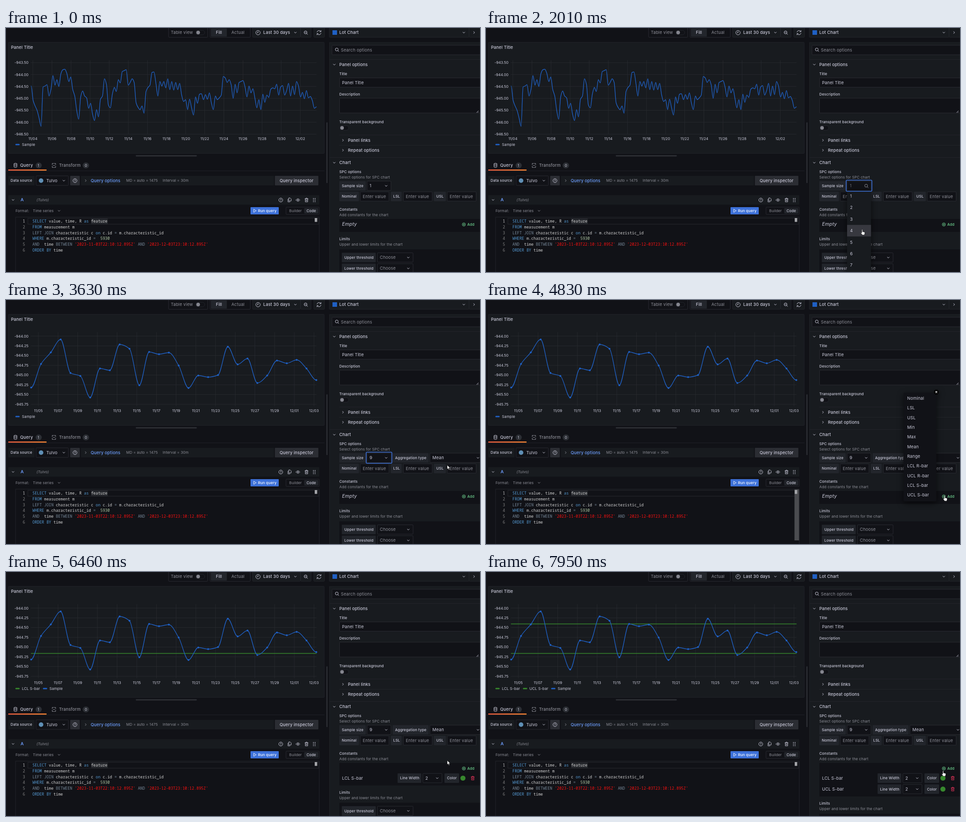
These frames come from a looping animation (1041 by 538 pixels, 8 s). An HTML page:

```html
<!DOCTYPE html>
<html lang="en">
<head>
<meta charset="utf-8">
<title>Panel editor</title>
<style>
html, body { margin: 0; width: 100%; height: 100%; overflow: hidden; background: #111217; }
svg { display: block; width: 1041px; height: 538px; font-family: Inter, sans-serif; letter-spacing: .01em; }
text { white-space: pre; }
.axis { letter-spacing: 0; }
.code { font-family: "Noto Sans Mono", "DejaVu Sans Mono", monospace; letter-spacing: 0; }
.pop { filter: drop-shadow(0 4px 7px rgba(0, 0, 0, .6)); }
</style>
</head>
<body>
<svg id="stage" viewBox="0 0 1041 538" xmlns="http://www.w3.org/2000/svg"></svg>
<script>
const LOOP = 8000;
const MAIN = '#ccccdc', DIM = '#8f9099', BG = '#111217', PANE = '#181b1f', RAISED = '#22252b', EDGE = '#34363d';
const BLUE = '#1f60c4', LINK = '#6e9fff', GREEN = '#37872d', MINT = '#6ccf8e', ROSE = '#e8355c';

// --- drawing helpers: y of a text is the middle of its capitals ---
const text = (x, y, s, size = 8, fill = MAIN, weight = 400, extra = '') =>
  `<text x="${x}" y="${y + size * .364}" font-size="${size}" fill="${fill}" font-weight="${weight}" ${extra}>${s}</text>`;
const body = (x, y, s, fill = MAIN, weight = 400) => text(x, y, s, 9.33, fill, weight);
const label = (x, y, s) => text(x, y, s, 8, MAIN, 500);
const rect = (x, y, w, h, fill, stroke = 'none', r = 1.3) =>
  `<rect x="${x}" y="${y}" width="${w}" height="${h}" rx="${r}" fill="${fill}" stroke="${stroke}" stroke-width=".7"/>`;
const line = (d, color = MAIN, w = 1) =>
  `<path d="${d}" fill="none" stroke="${color}" stroke-width="${w}" stroke-linecap="round" stroke-linejoin="round"/>`;
const rule = (x1, x2, y) => line(`M${x1} ${y}H${x2}`, '#26282e', .8);
const circle = (x, y, r, fill, stroke = 'none') =>
  `<circle cx="${x}" cy="${y}" r="${r}" fill="${fill}" stroke="${stroke}"/>`;
const down = (x, y, c = MAIN) => line(`M${x - 2.2} ${y - 1}l2.2 2.2 2.2 -2.2`, c);
const right = (x, y, c = MAIN) => line(`M${x - 1} ${y - 2.2}l2.2 2.2 -2.2 2.2`, c);
const group = (id, inner, extra = '') => `<g id="${id}" ${extra}>${inner}</g>`;
const tag = (x, y, w, s) => rect(x, y - 10.5, w, 21, RAISED) + label(x + 5.5, y, s);
const field = (x, y, w, s = '', c = DIM) => rect(x, y - 10.3, w, 20.6, BG, EDGE) + body(x + 5.5, y, s, c);
const select = (x, y, w, s, c = MAIN) => field(x, y, w, s, c) + down(x + w - 10.5, y);
const lens = (x, y, c = MAIN) => circle(x - .6, y - .6, 3.2, 'none', c) + line(`M${x + 1.9} ${y + 1.9}l2 2`, c);
const toggle = (x, y) => rect(x, y - 5, 20, 10, BG, '#2c2e35', 5) + circle(x + 5.5, y, 4, '#85868f');
const trash = (x, y, c) =>
  line(`M${x - 3.6} ${y - 2.6}h7.2M${x - 1.4} ${y - 2.6}v-1.5h2.8v1.5M${x - 2.7} ${y - 2.6}v6.8h5.4v-6.8M${x - .9} ${y - .4}v2.6M${x + .9} ${y - .4}v2.6`, c, .9);
const help = (x, y) => circle(x, y, 4.3, 'none', MAIN) + text(x, y, '?', 6.5, MAIN, 600, 'text-anchor="middle"');

function toolbar() {
  return rect(357, -3, 86, 23.5, BG, EDGE) + body(362, 10, 'Table view', DIM) + toggle(416.5, 10)
    + rect(448, -3, 88.5, 23.5, BG, EDGE) + rect(450, 1, 35, 18, RAISED)
    + body(461, 10, 'Fill', MAIN, 500) + body(495, 10, 'Actual', DIM)
    + rect(541.5, -3, 105, 23.5, PANE, '#2a2c32') + circle(553.5, 10.3, 4.8, 'none', MAIN) + line('M553.5 7.5v3h-1.8')
    + body(565, 10, 'Last 30 days', MAIN, 500) + down(635.5, 10)
    + rect(647, -3, 23, 23.5, PANE, '#2a2c32') + lens(658.5, 10.3) + line('M656.3 9.7h3.2', MAIN, .8)
    + rect(676, -3, 23.5, 23.5, PANE, '#2a2c32')
    + line('M683 9a4.6 4.6 0 0 1 8.4 -1.2M691.8 5.4v2.8h-2.8M691.8 11.5a4.6 4.6 0 0 1 -8.4 1.2M683 15.2v-2.8h2.8')
    + rect(710, -3, 307, 23.5, PANE, '#2a2c32') + rect(717, 5, 10, 10, BLUE, 'none', 0)
    + body(732, 10, 'Lot Chart', MAIN, 500) + down(1005.5, 10)
    + rect(1017, -3, 30, 23.5, PANE, '#2a2c32') + right(1028, 10);
}

function queryPane() {
  const dots = [0, 1, 2, 3, 4, 5].map(i => circle(675.2 + i % 2 * 3.6, 376 + (i >> 1) * 3.4, .9, MAIN)).join('');
  return rect(285, 280.6, 134, 2.6, '#2e3036') + rect(703.7, 208, 2.4, 134, '#2e3036')
    + line('M17.5 299.5a3 1.3 0 0 0 6.4 0a3 1.3 0 0 0 -6.4 0v6.6a3 1.3 0 0 0 6.4 0v-6.6M17.5 302.8a3 1.3 0 0 0 6.4 0', MAIN, .9)
    + body(31, 303, 'Query', MAIN, 500) + rect(65, 296.5, 13.5, 13, '#2c2f35', 'none', 6.5) + text(69.6, 303, '1')
    + line('M101.5 301.5v-3h3M106 298.5h3v3M109 304.500v3h-3M104.5 307.5h-3v-3M103.5 303h3.6', DIM)
    + body(116.5, 303, 'Transform', DIM, 500) + rect(168.5, 296.5, 14, 13, '#2c2f35', 'none', 6.5) + text(172.9, 303, '0')
    + rule(0, 699, 315) + rect(5, 312, 84, 2.4, 'url(#warm)', 'none', 0)
    + rect(5, 326, 58, 21, PANE) + label(10, 336.5, 'Data source')
    + rect(66, 326, 71, 21, BG, EDGE) + circle(77, 336.5, 5, '#5f8fb5') + body(88.5, 336.5, 'Tulvo') + down(127, 336.5)
    + rect(141, 326, 21, 21, '#2b2d33') + help(151.5, 336.5)
    + rect(164.5, 326, 424, 21, PANE) + right(175, 336.5, DIM) + body(186, 336.5, 'Query options', LINK, 500)
    + text(264, 336.5, 'MD = auto = 1475', 8, DIM) + text(344, 336.5, 'Interval = 30m', 8, DIM)
    + rect(590.5, 326, 95.5, 21, '#2b2d33') + body(601, 336.5, 'Query inspector', MAIN, 500)
    + rect(5, 368.5, 683, 21, PANE) + down(15.5, 379) + body(32, 379, 'A', LINK, 600)
    + text(67, 379, '(Tulvo)', 8, DIM, 400, 'font-style="italic"')
    + help(603.5, 379.300)
    + line('M621 376.3v-1.600h3l2.300 2.300v4.300h-5.3v-5M619.200 377.200v6.200h4.600', MAIN, .9)
    + line('M637 379.3q4.200 -6 8.400 0q-4.200 6 -8.400 0z', MAIN, .9) + circle(641.2, 379.3, 1.3, MAIN)
    + trash(660, 379.2, MAIN) + dots
    + text(21, 403, 'Format:', 8, DIM) + text(59, 403, 'Time series', 8, DIM) + down(116.5, 403, DIM)
    + rect(537, 395, 62, 16, '#3d71d9') + line('M544 400v6.400l5.200 -3.200z', '#fff', .9) + text(553.500, 403, 'Run query', 8, '#fff', 500)
    + rect(615, 395, 73, 16, BG, EDGE) + text(622, 403, 'Builder', 8, DIM) + rect(655, 397, 31, 12, RAISED) + label(660, 403, 'Code');
}

function editor() {
  const colors = { k: '#569cd6', o: '#778899', s: '#ff1010', n: '#b5cea8', p: '#d4d4d4' };
  const rows = [
    'k:SELECT|p: value, time, R |k:as|p: feature',
    'k:FROM|p: measurement m',
    'o:LEFT JOIN|p: characteristic c |k:on|p: c.id |o:=|p: m.characteristic_id',
    'k:WHERE|p: m.characteristic_id |o:=|n:  5930',
    "o:AND|p:  time |o:BETWEEN|s: '2023-11-03T22:10:12.895Z'|o: AND|s: '2023-12-03T23:10:12.895Z'",
    'k:ORDER BY|p: time'
  ];
  const size = 8.59;
  const lines = rows.map((row, i) => {
    const spans = row.split('|').map(p => `<tspan fill="${colors[p[0]]}">${p.slice(2)}</tspan>`).join('');
    const y = 426 + i * 12.72;
    return text(42, y, i + 1, size, i ? '#858585' : '#c6c6c6', 400, 'class="code" text-anchor="end"')
      + text(58, y, spans, size, MAIN, 400, 'class="code"');
  }).join('');
  return rect(21, 417, 667, 130, BG, '#2c2e35', 0) + rect(187, 420, 36.500, 12.500, '#24262b', 'none', 0)
    + rect(48, 419.700, 639, 13, 'none', '#303238', 0) + lines
    + group('bar', rect(677.5, 417.500, 10, 112.500, '#4b4c50', 'none', 0))
    + rect(678, 419, 5.500, 8.500, '#a3a4a8', 'none', 0);
}

function optionsPane() {
  const sub = (y, s) => right(740, y) + body(751, y, s, MAIN, 500);
  const head = (y, s) => down(721, y) + body(732, y, s, MAIN, 500);
  const constant = (y, s) => body(738, y, s) + tag(860, y, 52, 'Line Width') + select(915.500, y, 42, '2')
    + tag(963, y, 32, 'Color') + circle(1003.5, y, 5.6, GREEN) + trash(1025, y, ROSE);
  const limits = label(732, 465, 'Limits') + text(732, 477, 'Upper and lower limits for the chart', 8, DIM)
    + rect(732, 488, 320, 120, BG)
    + tag(737.500, 506, 74.500, 'Upper threshold') + select(815.500, 506, 78.500, 'Choose', DIM)
    + tag(737.500, 530, 74.500, 'Lower threshold') + select(815.500, 530, 78.500, 'Choose', DIM);
  return rect(710.5, 32, 340, 520, PANE, '#26282e', 0)
    + rect(716, 38, 340, 21, BG, EDGE) + lens(727, 48) + body(735.5, 48.3, 'Search options', DIM)
    + rule(711, 1041, 69.5) + head(80.6, 'Panel options')
    + label(732, 101, 'Title') + field(732.500, 120.300, 330, 'Panel Title', MAIN)
    + label(732, 146.500, 'Description') + rect(732.500, 154.800, 330, 32.500, BG, EDGE)
    + line('M1033.500 186.500l4 -4M1036 186.500l1.500 -1.500', MAIN, .8)
    + label(732, 207, 'Transparent background') + toggle(732.500, 220.300)
    + rule(732, 1041, 236) + sub(247.500, 'Panel links') + rule(732, 1041, 258.500) + sub(269.500, 'Repeat options')
    + rule(711, 1041, 285.500) + head(297, 'Chart')
    + label(732, 317.500, 'SPC options') + text(732, 328.700, 'Select options for SPC chart', 8, DIM)
    + tag(732, 348, 58, 'Sample size') + field(793, 348, 52.500)
    + group('value', '<g id="num"></g>' + down(835, 348))
    + group('search', text(799, 348, '1', 9.33, '#6b6c75') + lens(835.500, 348.300, DIM))
    + group('caret', line('M799 343v10', MAIN, .8))
    + group('aggregation', tag(849, 348, 79, 'Aggregation type') + select(931, 348, 116, 'Mean'))
    + tag(732, 371.500, 43, 'Nominal') + field(778, 371.500, 63, 'Enter value')
    + tag(845, 371.500, 24, 'LSL') + field(872.500, 371.500, 63.500, 'Enter value')
    + tag(939.500, 371.500, 26.500, 'USL') + field(969, 371.500, 63.500, 'Enter value')
    + label(732, 400, 'Constants') + text(732, 411.700, 'Add constants for the chart', 8, DIM)
    + '<rect id="box" x="732" y="421" width="320" fill="#111217"/>'
    + group('empty', text(738, 432, 'Empty', 10.67, MAIN, 400, 'font-style="italic"'))
    + circle(1005.500, 433.200, 3.500, 'none', MINT) + line('M1003.700 433.200h3.600M1005.500 431.400v3.600', MINT, .9)
    + text(1013, 433.200, 'Add', 8, MINT, 500)
    + group('row1', constant(454.500, 'LCL S-bar')) + group('row2', constant(478.700, 'UCL S-bar'))
    + group('limits', limits);
}

// --- charts ---
const L = 55.3, R = 681.5;
const raw = [
  128, 160, 172, 182, 199, 217, 130, 128, 125, 150, 135, 105, 126, 114, 129, 101, 92, 91, 100, 118, 108, 136, 150, 182,
  201, 152, 139, 150, 154, 177, 166, 190, 204, 180, 196, 157, 150, 112, 124, 170, 176, 146, 131, 140, 114, 121, 96, 94,
  92, 126, 120, 112, 120, 165, 175, 180, 172, 188, 140, 131, 126, 98, 97, 122, 150, 118, 128, 118, 132, 112, 136, 118,
  137, 120, 136, 122, 148, 162, 158, 180, 157, 176, 192, 152, 166, 146, 145, 158, 147, 157, 143, 165, 180, 150, 158, 154,
  148, 107, 110, 120, 114, 125, 155, 124, 143, 120, 118, 116, 130, 152, 128, 143, 134, 155, 176, 158, 180, 146, 164, 148,
  153, 135, 132, 134, 124, 148, 130, 127, 148, 138, 122, 150, 128, 147, 118, 128, 152, 142, 156, 138, 154, 151, 160, 177, 174];
const means = [193, 141, 115.5, 87, 161, 167.5, 215, 151, 155, 98, 107.5, 188, 114.5, 119.5, 116, 144.5, 194, 166.5,
  170, 165.5, 103, 142, 129, 183, 166.5, 133.5, 139.5, 132, 151, 176.5];

// Monotone cubic through evenly spaced values
function curve(ys) {
  const h = (R - L) / (ys.length - 1);
  const slope = ys.map((y, i) => {
    const a = y - ys[i - 1], b = ys[i + 1] - y;
    return a * b > 0 ? 2 * a * b / (a + b) : 0;
  });
  return ys.map((y, i) => {
    const x = L + i * h;
    if (!i) return `M${x} ${y}`;
    return `C${x - h * 2 / 3} ${ys[i - 1] + slope[i - 1] / 3} ${x - h / 3} ${y - slope[i] / 3} ${x} ${y}`;
  }).join('');
}

function axes(y0, dy, value, dv, rows, x0, dx, day, step) {
  let out = '';
  for (let i = 0; i < rows; i++) {
    const y = y0 + i * dy;
    out += line(`M${L} ${y}H${R}`, '#2a2d31', .8)
      + text(49.3, y, (value - i * dv).toFixed(2), 8, MAIN, 400, 'class="axis" text-anchor="end"');
  }
  for (let i = 0; i < 15; i++) {
    const x = x0 + i * dx, d = day + i * step;
    const date = d > 30 ? '12/0' + (d - 30) : '11/' + String(d).padStart(2, '0');
    out += line(`M${x} 71.5V234`, '#2a2d31', .8) + text(x, 243.7, date, 8, MAIN, 400, 'class="axis" text-anchor="middle"');
  }
  return out;
}

const key = (x, s, c) => rect(x, 255.6, 9.5, 3, c, 'none', 1.5) + text(x + 14.5, 257, s);
const limitLine = y => line(`M${L} ${y}H${R}`, GREEN, 1.5);

function chart() {
  const dots = means.map((y, i) => circle(L + i * (R - L) / 29, y, 2.1, BLUE)).join('');
  return rect(5, 31.5, 694, 245, PANE, '#26282e') + body(11, 42.7, 'Panel Title', MAIN, 500)
    + group('chartRaw', axes(76.4, 26.28, -943.5, .5, 7, 59, 41.95, 4, 2) + line(curve(raw), BLUE, 1.4))
    + group('chartMean', axes(79.6, 21.48, -944, .25, 8, 71, 43.24, 5, 2) + group('lcl', limitLine(179.5))
      + group('ucl', limitLine(114.5)) + line(curve(means), BLUE, 1.4) + dots)
    + group('key0', key(20.5, 'Sample', BLUE))
    + group('key1', key(20.5, 'LCL S-bar', GREEN) + key(81, 'Sample', BLUE))
    + group('key2', key(20.5, 'LCL S-bar', GREEN) + key(81, 'UCL S-bar', GREEN) + key(143, 'Sample', BLUE));
}

// --- pop-ups and pointer ---
const ROW = 25.4, TOP = 358, ITEM = 21.36;
function popups() {
  let sizes = '';
  for (let i = 0; i < 12; i++) sizes += body(799.5, TOP + (i + .5) * ROW, i + 1);
  const names = ['Nominal', 'LSL', 'USL', 'Min', 'Max', 'Mean', 'Range', 'LCL R-bar', 'UCL R-bar', 'LCL S-bar', 'UCL S-bar'];
  return group('sizes', rect(793, TOP, 52.5, 200, PANE, 'none', 0)
      + `<g clip-path="url(#list)"><g id="scroll"><rect id="hot" x="793" width="52.5" height="${ROW}" fill="#37383f"/>${sizes}</g></g>`
      + group('thumb', rect(841, 404, 4, 150, '#4a4b52', 'none', 2)), 'class="pop"')
    + group('ring', '<rect x="791" y="335.5" width="56.5" height="24.5" rx="2" fill="none" stroke="#3d71d9" stroke-width="1.6"/>')
    + group('adder', rect(917, 204.5, 72, 239.5, BG, 'none', 2)
      + `<rect id="pick" x="920" width="66" height="${ITEM}" rx="1" fill="#292b31"/>`
      + names.map((s, i) => body(925, 216.5 + i * ITEM, s)).join('')
      + circle(989, 203, 5.5, '#000') + line('M987.5 201.5l3 3M990.5 201.500l-3 3', '#fff', 1.4), 'class="pop"')
    + group('pointer',
      '<path id="arrow" d="M0 0V9.300L2.200 7.300 3.700 10.700 5.200 10 3.700 6.800H6.600z"/>'
      + '<path id="hand" d="M-.9 .9a.9 .9 0 0 1 1.800 0V5l3.900 .9q1.300 .400 1.100 1.800L4.900 12.200H.3L-3.200 7.700q.1 -1.600 2.300 0z"/>',
      'fill="#fff" stroke="#000" stroke-width=".6" stroke-linejoin="round"');
}

document.getElementById('stage').innerHTML =
  '<defs><linearGradient id="warm"><stop stop-color="#f55f3e"/><stop offset="1" stop-color="#ff8833"/></linearGradient>'
  + '<clipPath id="list"><rect x="793" y="358" width="53" height="180"/></clipPath></defs>'
  + toolbar() + chart() + queryPane() + editor() + optionsPane() + popups();

const $ = {};
document.querySelectorAll('#stage [id]').forEach(el => $[el.id] = el);
const show = (id, on) => $[id].style.display = on ? '' : 'none';
const within = (t, ...spans) => spans.some(([a, b]) => t >= a && t < b);
const ease = u => { u = Math.min(1, Math.max(0, u)); return u * u * (3 - 2 * u); };

const path = [
  [330, 957, 508], [790, 821, 353], [1000, 821, 353], [1470, 833, 383], [1680, 834, 398], [1750, 833, 402],
  [2200, 822, 470], [2490, 816, 489], [2560, 815.5, 503], [2630, 815, 511], [2950, 815, 511], [3630, 969, 364],
  [3700, 970, 367], [4050, 988, 468], [4440, 1007, 431], [5570, 1007, 431], [5930, 955, 407], [6320, 955, 407],
  [6460, 969, 415.5], [6900, 1006, 433], [7190, 1006, 433], [7500, 953, 429], [7650, 953, 429], [7950, 1004, 438]];

function pointerAt(t) {
  const i = path.findIndex(p => p[0] > t);
  if (i < 1) return path[i < 0 ? path.length - 1 : 0].slice(1);
  const [t0, x0, y0] = path[i - 1], [t1, x1, y1] = path[i], u = ease((t - t0) / (t1 - t0));
  return [x0 + (x1 - x0) * u, y0 + (y1 - y0) * u];
}

let lastNum = '';
function draw(t) {
  const [x, y] = pointerAt(t);
  const open = within(t, [930, 2890]), nine = t >= 2890, mean = t >= 2960;
  const count = t >= 7600 ? 2 : t >= 6320 ? 1 : 0;

  show('chartRaw', !mean);
  show('chartMean', mean);
  show('lcl', count > 0);
  show('ucl', count > 1);
  for (let i = 0; i < 3; i++) show('key' + i, count === i);

  show('value', !open);
  show('search', open);
  show('caret', open && !within(t, [1750, 2250]));
  show('ring', within(t, [930, 4300]));
  show('aggregation', nine);
  const num = nine ? '9' : '1';
  if (num !== lastNum) $.num.innerHTML = body(798.5, 348, lastNum = num);

  show('sizes', open);
  const scroll = 62 * ease((t - 2200) / 220);
  $.scroll.setAttribute('transform', `translate(0 ${-scroll})`);
  $.hot.setAttribute('y', TOP + Math.max(0, Math.floor((y - TOP + scroll) / ROW)) * ROW);
  show('thumb', scroll > 0);
  $.thumb.setAttribute('transform', `translate(0 ${(scroll - 62) * .74})`);

  show('empty', !count);
  show('row1', count > 0);
  show('row2', count > 1);
  $.box.setAttribute('height', [28.5, 49.5, 74][count]);
  $.limits.setAttribute('transform', `translate(0 ${[0, 20.7, 45][count]})`);

  show('adder', within(t, [4580, 6320], [7050, 7600]));
  const item = Math.floor((y - 216.5) / ITEM + .5);
  show('pick', x < 987 && item >= 0 && item < 11);
  $.pick.setAttribute('y', 216.5 + (item - .5) * ITEM);
  $.bar.setAttribute('opacity', Math.min(ease((t - 4640) / 120), 1 - ease((t - 5090) / 90)));

  const hand = within(t, [780, 2970], [4350, 6320], [6860, 7640], [7880, LOOP]);
  show('pointer', t >= 330);
  show('hand', hand);
  show('arrow', !hand);
  $.pointer.setAttribute('transform', `translate(${x} ${y})`);
}

function tick() {
  draw(performance.now() % LOOP);
  requestAnimationFrame(tick);
}
tick();
</script>
</body>
</html>
```
